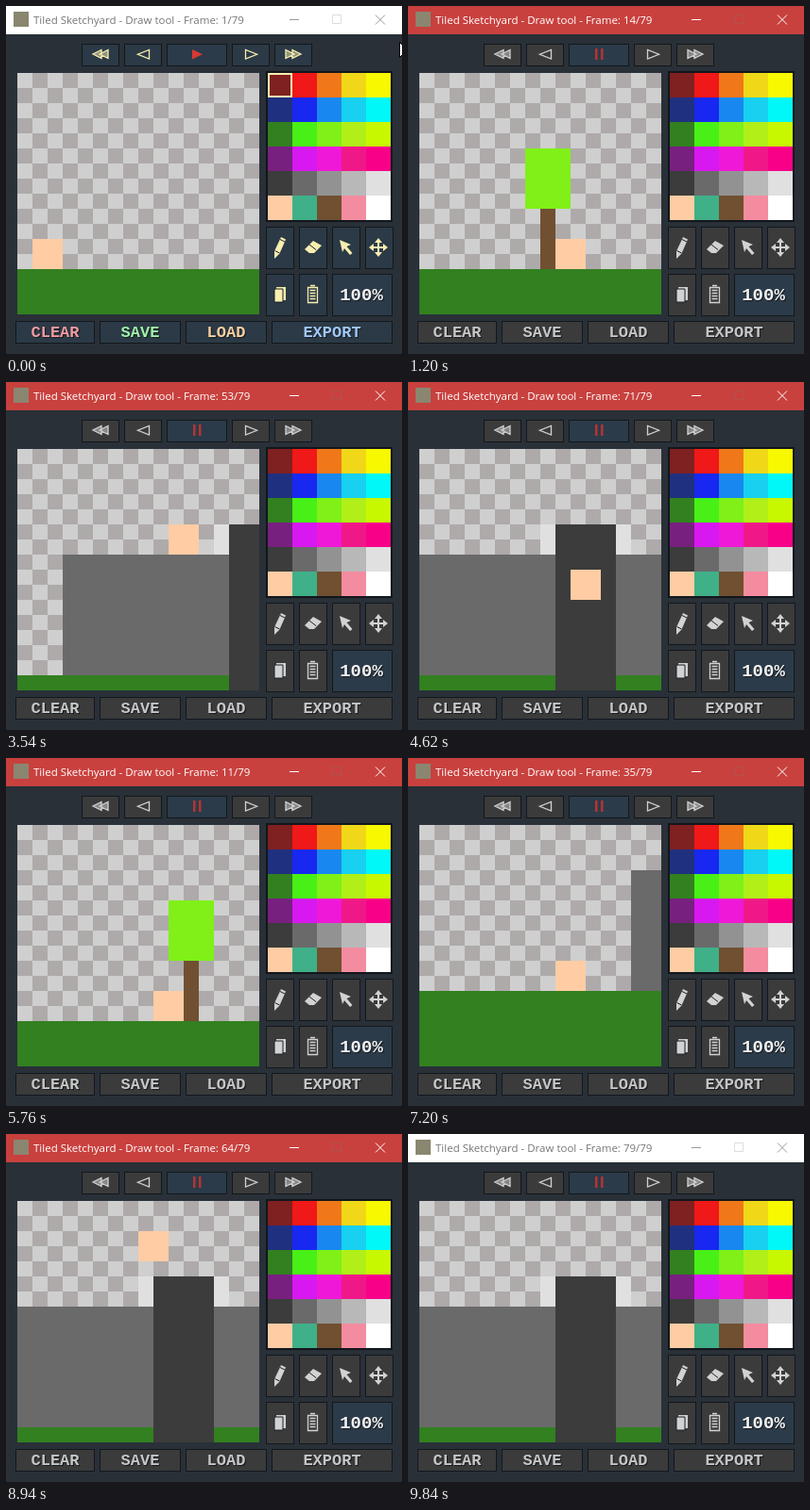
Write an HTML page with a canvas that moves like this. It is 419 px wide and 369 px high and loops after 9900 ms.

```html
<!DOCTYPE html>
<html lang="en">
<head>
<meta charset="utf-8">
<title>Tiled Sketchyard</title>
<style>
  html, body { margin: 0; width: 100%; height: 100%; overflow: hidden; background: #293038; }
  canvas { display: block; }
</style>
</head>
<body>
<canvas id="stage" width="419" height="369"></canvas>
<script>
const ctx = document.getElementById('stage').getContext('2d');
const STEP = 60, STEPS = 165, FRAMES = 79;
const PLAY_STEP = 6, BLUR_STEP = 163;

const PALETTE = [
  '#7f2120', '#f01818', '#f07818', '#f0d818', '#f8f800',
  '#203080', '#1828f0', '#1888f0', '#18d0f0', '#00f8f8',
  '#328020', '#48f018', '#80f018', '#b0f018', '#c8f800',
  '#782080', '#d818f0', '#f018d8', '#f01888', '#f80088',
  '#3c3c3c', '#6a6a6a', '#929292', '#b8b8b8', '#e0e0e0',
  '#ffcca4', '#40b088', '#705030', '#f48ca0', '#ffffff'];
const GRASS = PALETTE[10], LEAF = PALETTE[12], TRUNK = PALETTE[27];
const PIT = PALETTE[20], WALL = PALETTE[21], RIM = PALETTE[24], SKIN = PALETTE[25];
const CREAM = '#f8eeb0';

const clamp = (v, lo, hi) => Math.max(lo, Math.min(hi, v));

function rect(color, x, y, w, h) {
  ctx.fillStyle = color;
  ctx.fillRect(x, y, w, h);
}

function shape(d, { fill, stroke, width = 1 }) {
  const path = new Path2D(d);
  if (fill) { ctx.fillStyle = fill; ctx.fill(path); }
  if (stroke) { ctx.strokeStyle = stroke; ctx.lineWidth = width; ctx.stroke(path); }
}

function label(text, x, y, color, size) {
  ctx.font = `bold ${size}px "Liberation Mono", monospace`;
  ctx.textAlign = 'center';
  for (const [c, d] of [['#15191e', 1], [color, 0]]) {
    ctx.fillStyle = c;
    ctx.fillText(text, x + d, y + d);
  }
}

function button(x, y, w, h, fill) {
  rect('#12171c', x, y, w, h);
  rect(fill, x + 1, y + 1, w - 2, h - 2);
}

function titleBar(n, focused) {
  const ink = focused ? '#ffffff' : '#999999';
  rect(focused ? '#c8413e' : '#ffffff', 0, 0, 419, 30);
  rect('#8a8670', 8, 6, 16, 16);
  ctx.font = '11.5px "Open Sans", sans-serif';
  ctx.textAlign = 'left';
  ctx.fillStyle = focused ? '#ffffff' : '#777777';
  ctx.fillText(`Tiled Sketchyard - Draw tool - Frame: ${n}/${FRAMES}`, 29, 19);
  shape('M300 14.5h10M391 9.5l10 10m0-10l-10 10', { stroke: ink });
  shape('M345.5 9.5h9v9h-9z', { stroke: focused ? '#b2514f' : '#dddddd' });
}

function transport(playing, hover) {
  const fill = playing ? '#3b3b3b' : '#2b3a46';
  const ink = playing ? '#d2d2d2' : CREAM;
  for (const x of [80, 125, 239, 284]) button(x, 40, 40, 24, fill);
  button(170, 40, 64, 24, hover ? '#3a4e5d' : '#2b3b49');
  const outline = { stroke: ink, width: 1.3 };
  shape('M101 46.5v9l-9-4.5zM108 46.5v9l-9-4.5z', { ...outline, fill: ink + '80' });
  shape('M151.5 46.5v9.5l-12-4.75z', outline);
  shape('M253.5 46.5v9.5l12-4.75z', outline);
  shape('M303 46.5v9l9-4.5zM296 46.5v9l9-4.5z', { ...outline, fill: ink + '80' });
  if (playing) shape('M198 45h2.5v12h-2.5zM204 45h2.5v12h-2.5z', { fill: '#b43434' });
  else shape('M197 46v10.5l11-5.25z', { fill: '#d83a34' });
}

function palette(playing) {
  rect('#11161b', 275, 69, 134, 160);
  PALETTE.forEach((c, i) => rect(c, 277 + i % 5 * 26, 71 + Math.floor(i / 5) * 26, 26, 26));
  if (!playing) shape('M278 72h24v24h-24z', { stroke: CREAM, width: 2 });
}

function tools(playing) {
  const fill = playing ? '#3b3b3b' : '#2b3a46';
  const ink = playing ? '#d2d2d2' : CREAM;
  const dark = '#1b2026';
  for (const x of [275, 310, 345, 380]) button(x, 234, 30, 45, fill);
  for (const x of [275, 310]) button(x, 284, 30, 45, fill);
  button(345, 284, 64, 45, '#2b3b49');

  shape('M291 245l5 2.5-6.5 15-5.5 5.5v-8z', { fill: ink });
  shape('M284.5 259.5l5 2.5M290 247.5l5 2.5', { stroke: dark });
  shape('M325 249l9 5-8 8h-5l-5-4z', { fill: ink });
  shape('M321 253l7 5.5', { stroke: dark });
  shape('M353 248l12 5-4.5 2 6 7-2.5 2-6-7-2 4z', { fill: ink });
  shape('M394 246l4 5h-3v4h4v-3l5 4-5 4v-3h-4v4h3l-4 5-4-5h3v-4h-4v3l-5-4 5-4v3h4v-4h-3z', { fill: ink });
  shape('M286 298h10v14h-10z', { fill: ink });
  shape('M284 300h9v14h-9z', { fill: ink, stroke: dark });
  shape('M319.5 298.5h10v16h-10zM322 296.5h5M321.5 301.5h6m-6 3h6m-6 3h6m-6 3h6', { stroke: ink, width: 1.3 });
  label('100%', 376, 312, '#f2f2f2', 19);

  const actions = [
    ['CLEAR', 10, 84, '#f09aa0'], ['SAVE', 99, 86, '#a0f0a8'],
    ['LOAD', 190, 86, '#f8d0a0'], ['EXPORT', 281, 128, '#a0c8f8']];
  for (const [text, x, w, color] of actions) {
    button(x, 334, w, 24, fill);
    label(text, x + w / 2, 351, playing ? '#c6c6c6' : color, 17);
  }
}

function playerColumn(n) {
  if (n < 45) return Math.min(n, 9);
  if (n < 54) return 10;
  return n < 59 ? 64 - n : clamp(n - 56, 6, 10);
}

function playerRow(n) {
  if (n < 20) return 11;
  if (n < 25) return [10, 9, 8, 8, 9][n - 20];
  if (n < 39) return 9;
  if (n < 46) return Math.max(47 - n, 4);
  return n < 60 ? 5 : Math.max(2, 65 - n, n - 63);
}

function scene(n) {
  ctx.save();
  ctx.beginPath();
  ctx.rect(12, 71, 256, 256);
  ctx.clip();
  ctx.translate(12, 71);
  const cells = (color, x, y, w, h) => rect(color, x * 16, y * 16, w * 16, h * 16);
  for (let i = 0; i < 256; i++) {
    const x = i % 16, y = i >> 4;
    cells((x + y) % 2 ? '#aeaaaa' : '#cfcfcf', x, y, 1, 1);
  }
  const pan = clamp(n - 40, 0, 4);
  const tree = 21 - n;
  const wall = n < 45 ? Math.max(49 - n, 11) : 56 - n;
  const pit = Math.max(66 - n, 8);
  cells(GRASS, 0, 13 + pan, 16, 8);
  cells(GRASS, 32 - n, 11 + pan, 99, 8);
  cells(TRUNK, tree + 1, 9, 1, 4);
  cells(LEAF, tree, 5, 3, 4);
  cells(WALL, wall, 3 + pan, 99, 8);
  if (n > 50) {
    cells(RIM, pit, 5, 6, 2);
    cells(PIT, pit + 1, 5, 4, 11);
  }
  cells(SKIN, playerColumn(n), playerRow(n), 2, 2);
  ctx.restore();
}

function cursor(step) {
  if (step >= PLAY_STEP + 3) return;
  const [x, y] = [[416, 38], [335, 41], [250, 43]][step] || [205, 44];
  ctx.save();
  ctx.translate(x + 0.5 + Math.max(0, step - PLAY_STEP) * 85, y + 0.5);
  shape('M0 0v16l4-4 3 6 2-1-3-6h5z', { fill: '#ffffff', stroke: '#000000' });
  ctx.restore();
}

function draw() {
  const step = Math.floor(performance.now() / STEP) % STEPS;
  const playing = step >= PLAY_STEP;
  const n = Math.max(0, step - PLAY_STEP - 1) % FRAMES + 1;
  rect('#293038', 0, 0, 419, 369);
  titleBar(n, playing && step < BLUR_STEP);
  transport(playing, step >= 3 && step < PLAY_STEP + 1);
  palette(playing);
  tools(playing);
  scene(n);
  cursor(step);
  requestAnimationFrame(draw);
}
draw();
</script>
</body>
</html>
```
